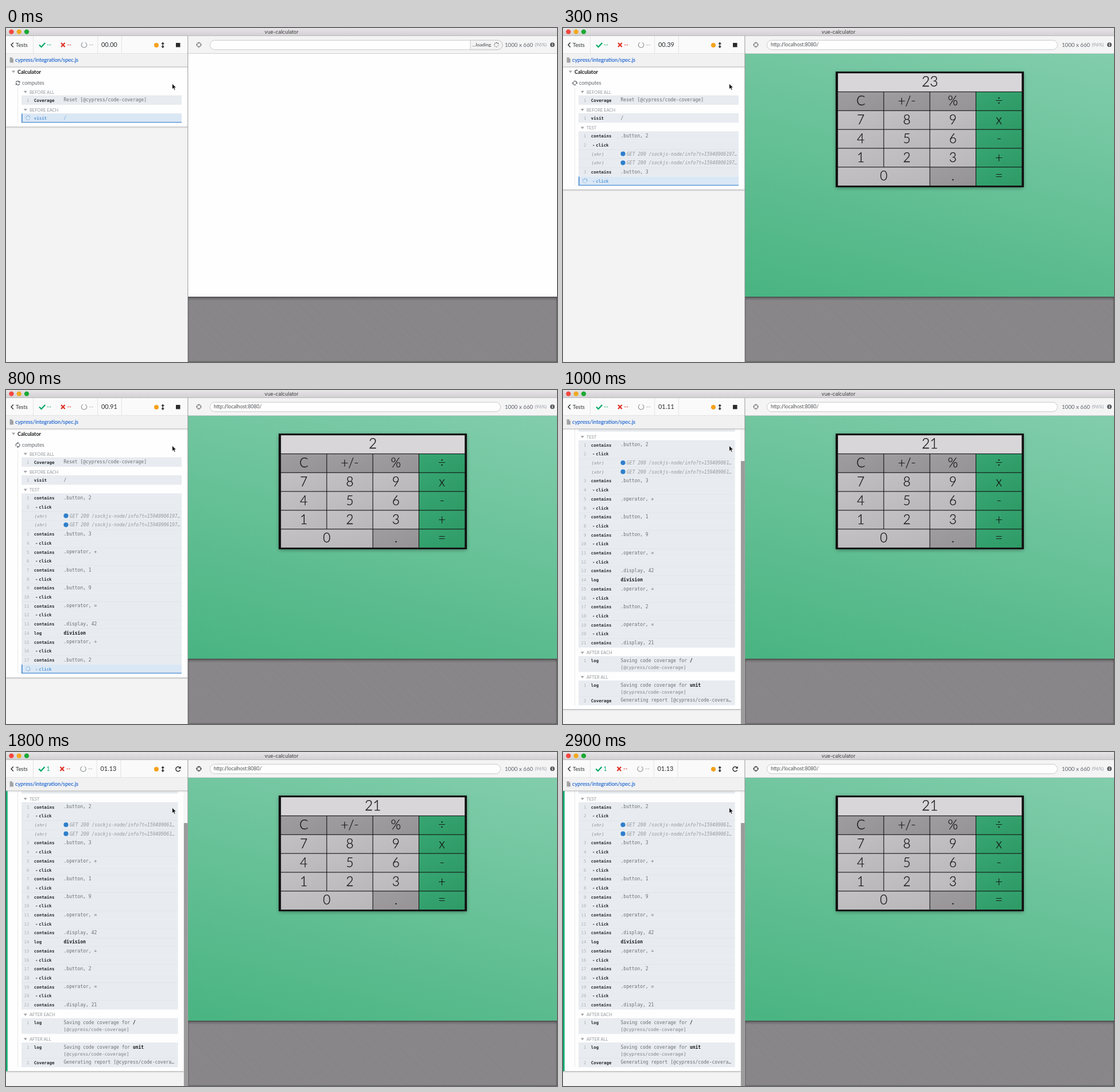
Animation, 960 px wide and 583 px high, one loop 3000 ms. Source, as an HTML page:

```html
<!DOCTYPE html>
<html lang="en">
<head>
<meta charset="utf-8">
<title>vue-calculator</title>
<style>
  html, body { margin: 0; width: 100%; height: 100%; overflow: hidden; background: #f3f3f4; }
  svg { display: block; width: 960px; height: 583px; font-family: Lato, sans-serif; }
  text { white-space: pre; }
  .mono { font-family: "DejaVu Sans Mono", monospace; }
  .title { font-family: Inter, sans-serif; }
  .key { font-weight: 300; stroke: #151515; stroke-width: .25px; }
</style>
</head>
<body>
<svg id="stage" viewBox="0 0 960 583" xmlns="http://www.w3.org/2000/svg">
  <defs>
    <linearGradient id="bar" x2="0" y2="1"><stop stop-color="#e6e4e6"/><stop offset="1" stop-color="#d1cfd1"/></linearGradient>
    <linearGradient id="page" gradientUnits="userSpaceOnUse" x1="565" y1="532" x2="712" y2="-18"><stop stop-color="#49b481"/><stop offset="1" stop-color="#82cdac"/></linearGradient>
    <linearGradient id="key" x2="1" y2="1"><stop stop-color="#c3c1c3"/><stop offset="1" stop-color="#b9b7b9"/></linearGradient>
    <linearGradient id="dark" x2="1" y2="1"><stop stop-color="#9f9d9f"/><stop offset="1" stop-color="#959395"/></linearGradient>
    <linearGradient id="op" x2="1" y2="1"><stop stop-color="#37a672"/><stop offset="1" stop-color="#2e9a66"/></linearGradient>
    <linearGradient id="fall" x2="0" y2="1"><stop stop-opacity=".3"/><stop offset="1" stop-opacity="0"/></linearGradient>
    <pattern id="stripes" width="3" height="3" patternUnits="userSpaceOnUse" patternTransform="rotate(45)">
      <rect width="3" height="3" fill="#8f8d90"/><rect width="3" height="1.3" fill="#7f7d80"/>
    </pattern>
    <filter id="blur" x="-10%" y="-10%" width="120%" height="120%"><feGaussianBlur stdDeviation="3"/></filter>
    <clipPath id="list"><rect y="68" width="317" height="515"/></clipPath>
  </defs>
  <g id="app"></g>
  <g id="log" clip-path="url(#list)"></g>
  <g id="chrome"></g>
</svg>
<script>
const LOOP = 3000, TICK = 100, PASSED = 1100;
const ROW = 15.7, TALL = 26.8, VIEW_TOP = 45, BOTTOM = 583;
const $ = id => document.getElementById(id);

const rect = (x, y, w, h, fill, more = '') =>
  `<rect x="${x}" y="${y}" width="${w}" height="${h}" fill="${fill}" ${more}/>`;
const dot = (x, y, r, fill, more = '') =>
  `<circle cx="${x}" cy="${y}" r="${r}" fill="${fill}" ${more}/>`;
const path = (d, fill, more = '') => `<path d="${d}" fill="${fill}" ${more}/>`;
const line = (d, color, width = 1, more = '') =>
  `<path d="${d}" fill="none" stroke="${color}" stroke-width="${width}" ${more}/>`;
const text = (x, y, size, fill, str, more = '') =>
  `<text x="${x}" y="${y}" font-size="${size}" fill="${fill}" ${more}>${str}</text>`;
const mono = (x, y, size, fill, str, more = '') =>
  text(x, y, size, fill, str, 'class="mono" ' + more);
const arrow = (x, y) => path(`M${x} ${y}h6l-3 4z`, '#a3a3a3');

function spinner(x, y, color, angle) {
  let out = '';
  for (let i = 0; i < 8; i++) {
    const a = (i * 45 + angle) * Math.PI / 180;
    out += dot(x + 3.6 * Math.cos(a), y + 3.6 * Math.sin(a), 0.55 + i * 0.05, color);
  }
  return out;
}

// Command log: headings and commands in the order they appear.
const head = label => ({ label, h: ROW });
const cmd = (num, name, msg = '', more = {}) => ({ num, name, msg, h: ROW, ...more });
const pkg = '[@cypress/code-coverage]';
const items = [head('BEFORE ALL'), cmd(1, 'Coverage', 'Reset ' + pkg),
  head('BEFORE EACH'), cmd(1, 'visit', '/'), head('TEST')];
let count = 0;
const contains = msg => items.push(cmd(++count, 'contains', msg));
const press = msg => { contains(msg); items.push(cmd(++count, 'click')); };
press('.button, 2');
for (let i = 0; i < 2; i++) items.push(cmd('', 'xhr', 'GET 200 /sockjs-node/info?t=1594090619712'));
['.button, 3', '.operator, +', '.button, 1', '.button, 9', '.operator, ='].forEach(press);
contains('.display, 42');
items.push(cmd(++count, 'log', '', { strong: 'division' }));
['.operator, ÷', '.button, 2', '.operator, ='].forEach(press);
contains('.display, 21');
const saving = strong => cmd(1, 'log', 'Saving code coverage for ', { strong, note: pkg, h: TALL });
items.push(head('AFTER EACH'), saving('/'), head('AFTER ALL'), saving('unit'),
  cmd(2, 'Coverage', 'Generating report ' + pkg));

// Per tick: items visible and calculator display.
const shown = [4, 4, 7, 11, 13, 17, 19, 23, 25, 30, items.length];
const display = [0, 0, 2, 23, 23, 19, 42, 42, 2, 21, 21];

const clip = (str, max) => str.length > max ? str.slice(0, max - 1) + '…' : str;

function command(it, y, right, live, spin) {
  const base = y + 10.3, mid = y + 7.2, xhr = it.name === 'xhr';
  const nameInk = live ? '#5a9ad9' : '#24292e', ink = live ? '#7ba7d3' : '#6b7075';
  let out = rect(27, y, right - 27, it.h + 0.1, live ? '#dae7f5' : '#e8ecf0');
  if (it.name !== 'click') out += line(`M27 ${y}H${right}`, '#dde3e8', 0.7);
  if (live) {
    out += rect(27, y, 1.6, it.h, '#3f87cd') + rect(28, y + it.h - 1.4, right - 28, 1.4, '#5b98d6');
    out += spinner(38.3, mid, '#5a9ad9', spin);
  } else {
    out += mono(40.5, base, 7.4, '#aab1b7', it.num, 'text-anchor="end"');
  }
  if (xhr) {
    const max = right > 300 ? 40 : 38;
    return out + mono(49.5, base, 7.4, '#878c91', '(xhr)', 'font-style="italic"')
      + dot(104.5, mid, 4.1, '#2f7fcb')
      + mono(111, base - 0.2, 8, '#94999e', clip(it.msg, max), 'font-style="italic"');
  }
  const click = it.name === 'click';
  if (click) out += mono(51, base, 7.4, nameInk, '-', 'font-weight="bold"');
  out += mono(click ? 57.3 : 48.8, base, 7.4, nameInk, it.name, 'font-weight="bold"');
  const strong = it.strong ? `<tspan font-weight="bold" fill="#17191b">${it.strong}</tspan>` : '';
  out += mono(100.5, base - 0.3, 8, ink, clip(it.msg, 40) + strong);
  if (it.note) out += mono(100.5, base + 11.8, 7.9, '#7d8287', it.note);
  return out;
}

function drawLog(t, n) {
  const list = items.slice(0, n), passed = t >= PASSED;
  const end = list.reduce((y, it) => y + it.h, 102.5) + 6.8;
  const scroll = Math.max(0, end + 26 - BOTTOM);
  const edge = scroll ? 309.7 : 316.5, right = scroll ? 299.6 : 306;
  const spin = Math.max(0, t - 100) * 0.18;
  let out = rect(0, 68, 317, 515, '#f3f3f4');
  let g = rect(0, end, edge, 1.3, '#b4b4b4') + rect(0, end + 1.3, edge, 1.5, '#e3e3e4')
    + rect(0, 60, edge, end - 60, '#fefefe');
  g += arrow(10, 74.6) + text(20, 79.6, 9.05, '#17191b', 'Calculator', 'font-weight="bold"');
  if (passed) g += line('M17.5 96l2.2 2.5 4-5', '#08a868', 1.6);
  else g += `<g transform="translate(20.6 96) rotate(${spin})">`
    + line('M-3.3 -.9A3.4 3.4 0 0 1 2.6 -2.2M3.3 .9A3.4 3.4 0 0 1 -2.6 2.2', '#5f6368', 1.2)
    + path('M3.9 -3.8v3.2h-3.2zM-3.9 3.8v-3.2h3.2z', '#5f6368') + '</g>';
  g += text(28, 99, 9, '#5f6368', 'computes') + rect(20, 105, 1, end - 112, '#e9e9ea');
  let y = 102.5;
  list.forEach((it, i) => {
    if (it.label) g += arrow(30.8, y + 7.2) + text(41, y + 12, 7.5, '#94989c', it.label);
    else g += command(it, y, right, t < 1000 && i === n - 1, spin);
    y += it.h;
  });
  if (passed) g += rect(0, 60, 2.7, end - 60, '#08ab6d');
  out += `<g transform="translate(0 ${-scroll})">${g}</g>`;
  if (scroll) {
    const view = BOTTOM - VIEW_TOP, size = view * view / (view + scroll);
    out += rect(309.7, 68, 7.3, 515, '#f6f6f7') + rect(309.9, BOTTOM - size, 6.6, size, '#9b9b9c');
  }
  return out;
}

function drawApp(t, value) {
  let out = rect(317, 469, 643, 114, 'url(#stripes)') + rect(317, 469, 643, 7, 'url(#fall)')
    + rect(317.5, 469.5, 642, 113, 'none', 'stroke="#000" stroke-opacity=".22" stroke-width="2"');
  if (t < 100) return out + rect(317, 45, 643, 424, '#fefefe');
  out += rect(317, 45, 643, 424, 'url(#page)');
  out += rect(476, 78, 326, 201, '#000', 'opacity=".42" filter="url(#blur)"');
  out += rect(475, 76, 328, 202, '#121212');
  const w = 80.3, h = 32.85, x0 = 478.6, y0 = 78.6;
  const cell = (c, r, span, fill, label, size = 22.5) => {
    const x = x0 + c * w, y = y0 + r * h;
    return rect(x + 0.5, y + 0.5, w * span - 1.1, h - 1.1, fill)
      + text(x + w * span / 2, y + 23.6, size, '#151515', label, 'text-anchor="middle" class="key"');
  };
  out += cell(0, 0, 4, '#d8d6d8', value, 24.5);
  const rows = ['C,+/-,%,÷', '7,8,9,x', '4,5,6,-', '1,2,3,+'];
  rows.forEach((row, r) => row.split(',').forEach((label, c) => {
    out += cell(c, r + 1, 1, `url(#${c === 3 ? 'op' : r ? 'key' : 'dark'})`, label);
  }));
  return out + cell(0, 5, 2, 'url(#key)', '0') + cell(2, 5, 1, 'url(#dark)', '.') + cell(3, 5, 1, 'url(#op)', '=');
}

function drawToolbar(t) {
  const passed = t >= PASSED, s = passed ? -1.5 : 0;
  const secs = t < 200 ? 0 : passed ? 1.13 : 0.085 + t * 0.001025;
  let out = rect(0, 14, 317, 31, '#fafafa') + rect(0, 44.3, 317, 0.8, '#dcdcdc');
  [47, 159.3 + s, 201 + s].forEach(x => out += rect(x, 14, 0.8, 31, '#dedede'));
  out += line('M12.8 25.4L9 29.4L12.8 33.4', '#2b2e31', 1.4) + text(17, 32.8, 9.4, '#2b2e31', 'Tests');
  out += line(`M${58 + s / 2} 29.5l3.6 3.7l6.6 -7.2`, '#08a868', 2.3)
    + text(71 + s / 3, 33, 10.5, '#08a868', passed ? '1' : '--');
  out += line(`M${96 + s} 26l6.6 7m0 -7l-6.6 7`, '#df3026', 2.2) + text(106.2 + s, 33, 10.5, '#df3026', '--');
  out += line(`M${134.2 + s} 25.2a4.7 4.7 0 1 0 3.8 0`, '#94989c', 1.2) + text(144.5 + s, 33, 10.5, '#a3a6a9', '--');
  const clock = secs.toFixed(2).padStart(5, '0');
  out += text(166 + s, 33, 10.9, '#2b2e31', clock);
  out += dot(262, 30, 4, '#f4a11c');
  out += line('M273.2 27v6', '#2b2e31', 1.4) + path('M270.4 28l2.8 -3.4l2.8 3.4zM270.4 31.8l2.8 3.4l2.8 -3.4z', '#2b2e31');
  if (passed) out += line('M303 27.2A4 4 0 1 0 303.6 31.2', '#2b2e31', 1.4) + path('M304.7 24.8v4.2h-4.2z', '#2b2e31');
  else out += rect(296, 26, 7.5, 7.4, '#2b2b2d');
  return out;
}

function drawChrome(t) {
  const loading = t < 200, aim = t >= PASSED ? '#333' : '#777';
  const right = loading ? 865 : 861.5;
  let out = rect(0, 0, 960, 14, 'url(#bar)') + rect(0, 13.3, 960, 0.8, '#b3b1b3');
  out += dot(9.4, 6.6, 4.2, '#f4473f') + dot(22.7, 6.6, 4.2, '#f2a91f') + dot(36, 6.6, 4.2, '#1ba934');
  out += text(480, 10, 8.6, '#3d3c3d', 'vue-calculator', 'text-anchor="middle" class="title"');
  out += drawToolbar(t);
  out += rect(0, 45, 317, 23, '#f1f1f2') + rect(0, 67.2, 317, 1.1, '#c3c3c4') + rect(0, 68.3, 317, 2, '#000', 'opacity=".06"');
  out += path('M6.6 51.2h4l2.4 2.5v6.7h-6.4z', '#a2a3a4') + path('M10.6 51.2v2.5h2.4z', '#d6d6d7');
  out += text(16, 59, 9.3, '#1e66d0', 'cypress/integration/spec.js', 'stroke="#1e66d0" stroke-width=".15"');
  out += rect(317, 14, 643, 31, '#f4f4f5') + rect(317, 44.2, 643, 0.8, '#c9c9ca');
  out += dot(336, 29.3, 3.7, 'none', `stroke="${aim}" stroke-width="1.1"`)
    + line('M336 24.4v3.2M336 31v3.2M331.1 29.3h3.2M337.7 29.3h3.2', aim, 1.1);
  out += rect(355.4, 21.4, right - 355.4, 16.4, '#fefefe', 'rx="8.2" stroke="#c4c4c5" stroke-width=".9"');
  if (loading) {
    out += path('M809 21.4h47.8a8.2 8.2 0 0 1 0 16.4h-47.8z', '#f3f3f4', 'stroke="#c4c4c5" stroke-width=".9"');
    out += text(812.5, 32.3, 8.4, '#3f4245', '...loading') + spinner(854.5, 29.3, '#3f4245', t * 0.18);
  }
  if (t >= 100) out += text(362, 32.3, 8.65, '#4a4d50', 'http://localhost:8080/');
  out += text(869, 32.6, 9.7, '#5f6368', '1000 x 660') + text(921.5, 32.3, 8.2, '#94989c', '(96%)');
  out += dot(952, 29.2, 3.9, '#56595c') + rect(951.4, 28.5, 1.3, 3.1, '#fff') + dot(952, 27.2, 0.75, '#fff');
  out += rect(316.4, 14, 0.9, 569, '#8f8f90');
  return out + path('M289.6 97.2v9.6l2.2 -2l1.5 3.5l1.7 -.8l-1.5 -3.4h3z', '#0b0b0b', 'stroke="#fff" stroke-width=".7"');
}

function draw(t) {
  const i = Math.min(t / TICK, shown.length - 1);
  $('app').innerHTML = drawApp(t, display[i]);
  $('log').innerHTML = drawLog(t, shown[i]);
  $('chrome').innerHTML = drawChrome(t);
}

const start = performance.now();
let last = 0;
function frame(now) {
  const t = Math.floor(Math.max(0, now - start) % LOOP / TICK) * TICK;
  if (t !== last) draw(last = t);
  requestAnimationFrame(frame);
}
draw(0);
requestAnimationFrame(frame);
</script>
</body>
</html>
```
